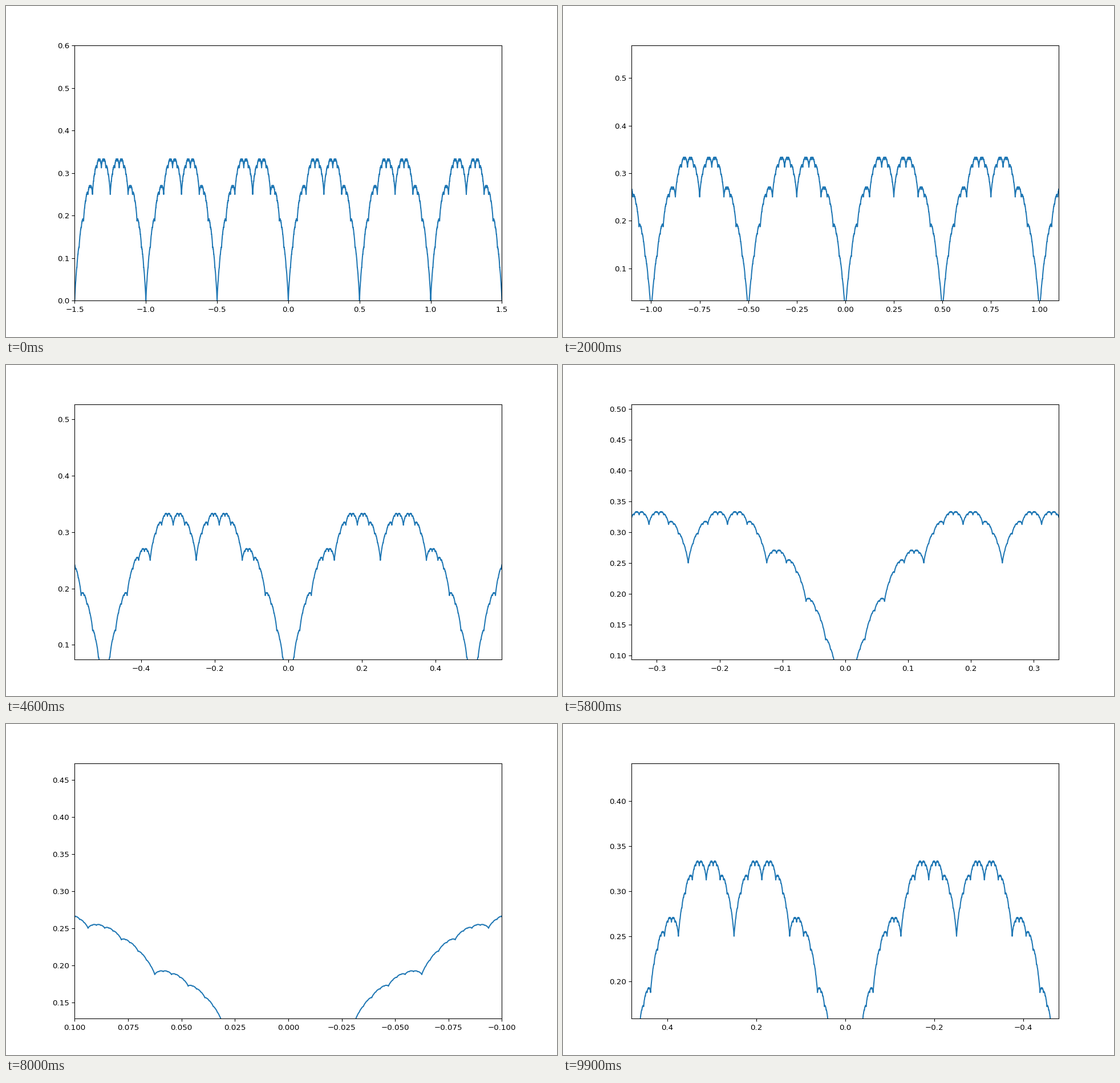
A matplotlib script that plays this animation: 966x580 px, repeating every 10000 ms.

```python
import numpy as np
import matplotlib.pyplot as plt
from matplotlib.animation import FuncAnimation

W, H, DPI = 966, 580, 96.6
LEFT, RIGHT, TOP, BOTTOM = 120.4, 869.4, 69.4, 516.4  # plot box in pixels
FRAMES, INTERVAL = 100, 100
TERMS = 14


def blancmange(x):
    """Takagi curve with period 1/2 and maximum 1/3."""
    y = np.zeros_like(x)
    for n in range(1, TERMS):
        t = x * 2**n
        y += np.abs(t - np.round(t)) / 2**n
    return y


# The small margin keeps the pixel size from being truncated.
fig, ax = plt.subplots(figsize=((W + 0.001) / DPI, (H + 0.001) / DPI), dpi=DPI)
fig.subplots_adjust(left=LEFT / W, right=RIGHT / W,
                    top=1 - TOP / H, bottom=1 - BOTTOM / H)
x = np.linspace(-1.5, 1.5, 3 * 2**12 + 1)
ax.plot(x, blancmange(x), color="#1f77b4", lw=1.5)


def zoom(i):
    # The half-width shrinks through zero, after which the axis is mirrored.
    half = round(1.5 - 0.02 * i, 6) or 0.05
    ax.set_xlim(-half, half)
    ax.set_ylim(0.0016 * i, 0.6 - 0.0016 * i)
    return ax.lines


anim = FuncAnimation(fig, zoom, frames=FRAMES, interval=INTERVAL,
                     init_func=lambda: zoom(0), repeat=True, repeat_delay=0)
plt.show()
```
